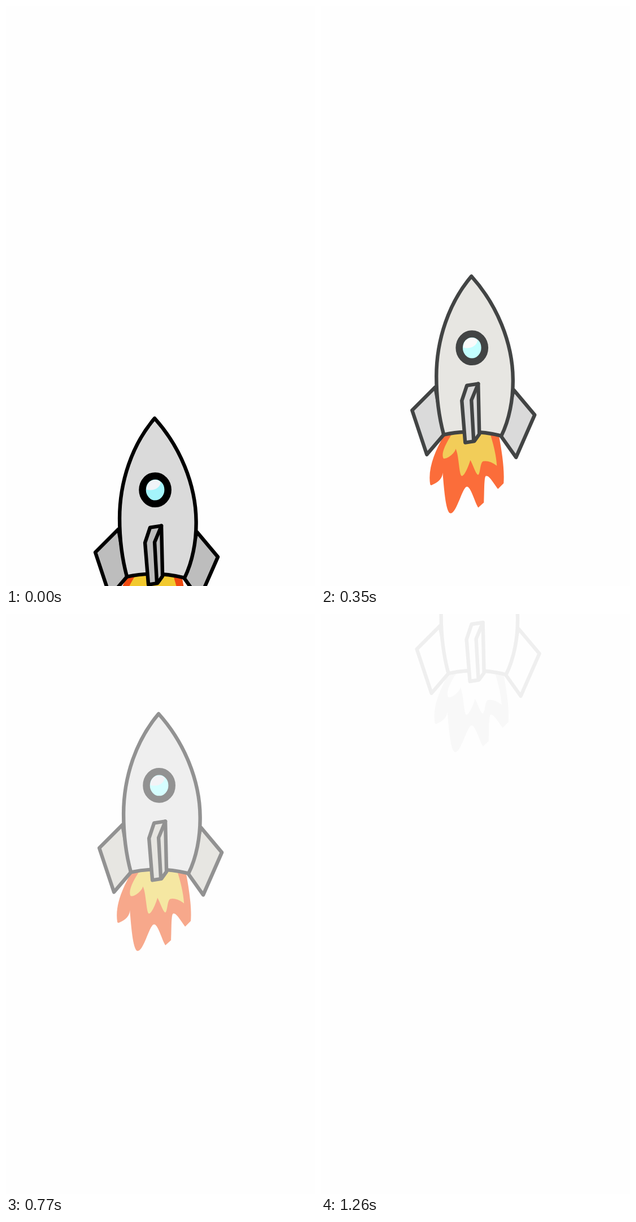
Animation of 547x1025 px, one loop 1400 ms. Source, as an HTML page:

```html
<!DOCTYPE html>
<html lang="en">
<head>
<meta charset="utf-8">
<title>Rocket launch</title>
<style>
  html, body { margin: 0; width: 100%; height: 100%; overflow: hidden; background: #fefefe; }
  svg { display: block; width: 547px; height: 1025px; }
  .line { stroke-width: 6.4; stroke-linejoin: round; stroke-linecap: round; stroke: var(--line); }
  .body { fill: var(--body); }
  .fin { fill: var(--fin); }
  .red { fill: var(--red); }
  .yellow { fill: var(--yellow); }
  .glass { fill: var(--glass); stroke: var(--line); stroke-width: 12.5; }
  .shine { fill: var(--shine); }
</style>
</head>
<body>
<svg viewBox="0 0 547 1025">
  <g id="rocket">
    <path class="red" d="M218 856C203 883 187 915 192 946Q193 948 195 947Q214 939 214 925C216 945 219 997 228 997C239 997 249 950 257 950C264 950 270 975 277 987L287 978C288 960 287 931 291 931C297 930 304 944 312 954L322 944C324 917 318 883 313 856Z"/>
    <path class="yellow" d="M231 856C222 870 211 889 215 899C218 904 236 892 237 883C243 892 243 931 248 931C253 931 261 911 263 903C267 909 273 929 277 929C281 927 280 907 286 905Q297 903 310 913C309 895 304 875 298 856Z"/>
    <path class="fin line" d="M201 774L160 815L186 893L216 858ZM340 779L377 823L344 898L317 860Z"/>
    <path class="body line" d="M265 578C225 625 203 690 203 755C203 790 207 825 216 858Q265 847 318 860C332 832 339 795 338.5 760C338 695 310 628 265 578Z"/>
    <ellipse class="glass" cx="266" cy="704.5" rx="22.6" ry="24.7"/>
    <path class="shine" d="M250.500 704C251 692 258 687 266 687Q273 687 276 692C273 703 261 707 250.500 704Z"/>
    <path class="fin line" d="M257 771L277 768L279 857L270 869.500L254 872L248 798Z"/>
    <path class="line" fill="none" d="M277 768L265 797L269 869"/>
  </g>
</svg>
<script>
const STEP = 70, LAST = 18, LOOP = 1400;
const rocket = document.getElementById("rocket");

// Colours of each part as it fades, at these steps
const stops = [0, 3, 5, 7, 11, 14, 18];
const fades = {
  line:   "000000 292929 424444 5c5d5c 929292 bdbdbd efefef",
  body:   "dadada dadada e7e6e2 e7e6e2 efefef f8f8f8 fefefe",
  fin:    "bdbdbd c5c5c5 dadada dadada e7e6e2 efefef fefefe",
  red:    "f04a10 ed5b26 fb6d3a f5855c f7a88b efc8bd f8f8f8",
  yellow: "f2c92e f1cb49 f2cd59 f0d67d f5e7a2 e7e6e2 fefefe",
  glass:  "a4f4fb b5fafd c3feff ccfeff d6feff fefefe fefefe",
  shine:  "f0f4f8 f3f6f8 fafafa f0f0f0 f3f3f6 fefefe fefefe"
};
const channels = hex => [0, 2, 4].map(i => parseInt(hex.slice(i, i + 2), 16));
const parts = Object.entries(fades).map(([name, list]) => [name, list.split(" ").map(channels)]);

function colourAt(colours, step) {
  const i = Math.max(0, stops.findIndex(s => s >= step) - 1);
  const mix = (step - stops[i]) / (stops[i + 1] - stops[i]);
  return `rgb(${colours[i].map((c, j) => Math.round(c + (colours[i + 1][j] - c) * mix))})`;
}

function draw(now) {
  const step = Math.min(LAST, Math.floor(now % LOOP / STEP));
  rocket.setAttribute("transform", `translate(${0.64 * (step - 3)} ${-50.2 * (step - 3)})`);
  for (const [name, colours] of parts) {
    rocket.style.setProperty("--" + name, colourAt(colours, step));
  }
}

const start = performance.now();
function tick() {
  draw(performance.now() - start);
  requestAnimationFrame(tick);
}
tick();
</script>
</body>
</html>
```
